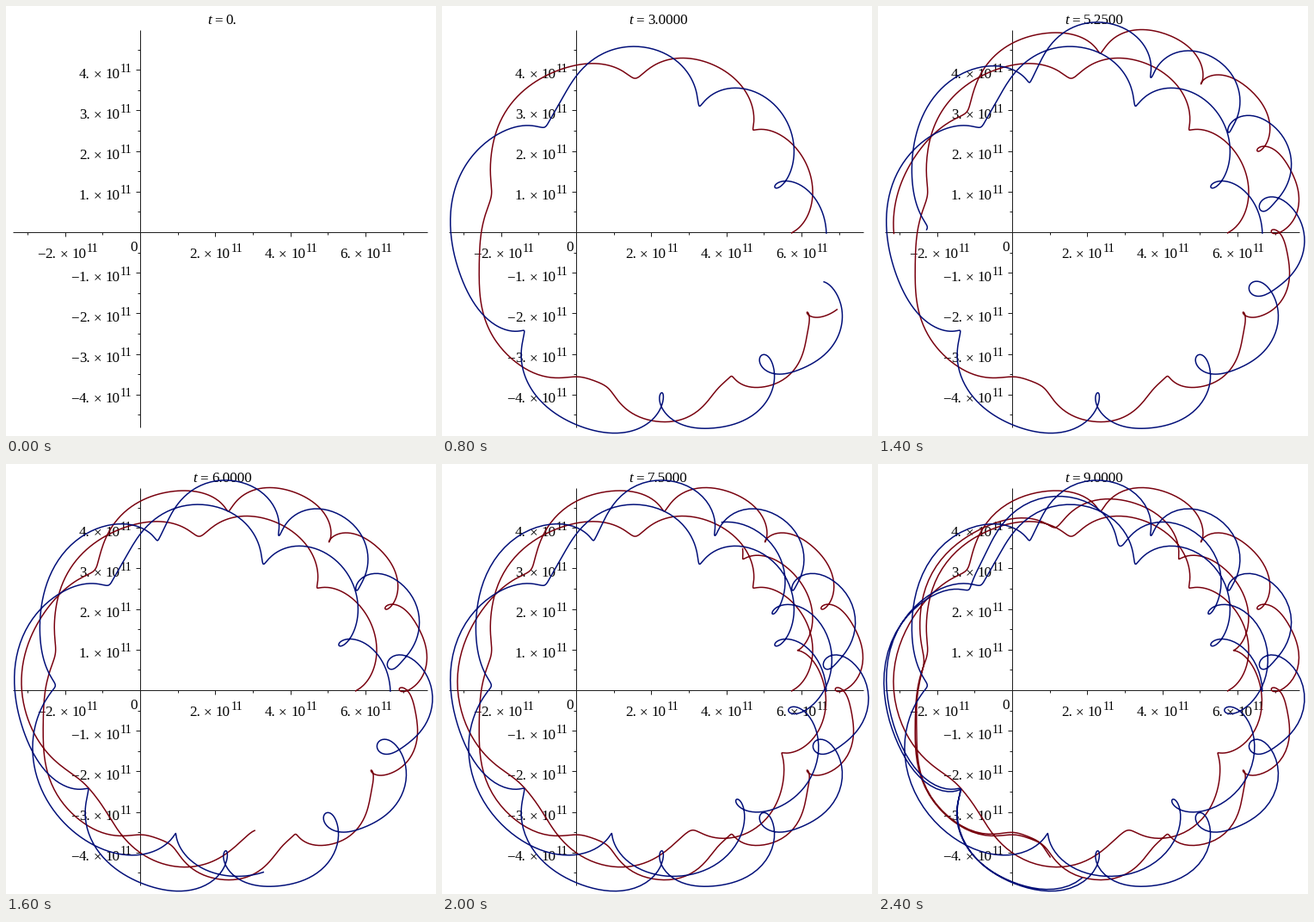
Write a matplotlib script that moves like this. It is 500 px wide and 500 px high and loops after 2500 ms.

```python
import numpy as np
import matplotlib.pyplot as plt
from matplotlib.animation import FuncAnimation

SIZE, DPI = 500, 100
PX = 72 / DPI
FRAMES, T_END = 25, 9.0
OX, OY, UX, UY = 157, 264, 43.65, 47.2  # origin and pixels per 1e11
RED, BLUE = "#78000e", "#000e78"

# A close pair circles a star at the origin. At each apsis of the wide orbit:
# time, distance, direction, eccentricity of the pair, mean angle of the pair.
APSIDES = np.array([
    (0.00, 6.08, 0, .06, 6),
    (1.56, 2.79, 180, .25, 1287),
    (3.42, 7.25, 365, .28, 3010),
    (5.27, 2.83, 545, .15, 4718),
    (6.89, 6.31, 726, .13, 6085),
    (8.47, 2.82, 904, .26, 7407),
    (10.33, 7.25, 1085, .30, 9200),
])
PAIR_SIZE = .94
PERIAPSIS = np.radians(70)
SHARE = .39  # red's part of the separation


def pair_center(t):
    """Follow half a Kepler ellipse from one apsis to the next."""
    time, dist, turn = APSIDES[:, :3].T
    k = np.clip(np.searchsorted(time, t, side="right") - 1, 0, len(time) - 2)
    mean = np.pi * (t - time[k]) / (time[k + 1] - time[k])
    a = (dist[k] + dist[k + 1]) / 2
    e = (dist[k + 1] - dist[k]) / (2 * a)
    ecc = mean + e * np.sin(mean)
    for _ in range(6):
        ecc -= (ecc - e * np.sin(ecc) - mean) / (1 - e * np.cos(ecc))
    true = np.arctan2(np.sqrt(1 - e * e) * np.sin(ecc), np.cos(ecc) - e)
    angle = np.radians(turn[k] + (turn[k + 1] - turn[k]) * true / np.pi)
    return a * (1 - e * np.cos(ecc)) * np.exp(1j * angle)


def pair_offset(t):
    """Vector from the red body to the blue one."""
    time = APSIDES[:, 0]
    e = np.interp(t, time, APSIDES[:, 3])
    mean = np.radians(np.interp(t, time, APSIDES[:, 4]))
    angle = mean + 2 * e * np.sin(mean - PERIAPSIS)
    return PAIR_SIZE * (1 - e * np.cos(angle - PERIAPSIS)) * np.exp(1j * angle)


def bodies(t):
    center, offset = pair_center(t), pair_offset(t)
    return center - SHARE * offset, center + (1 - SHARE) * offset


fig = plt.figure(figsize=(SIZE / DPI, SIZE / DPI), dpi=DPI, facecolor="white")
ax = fig.add_axes([0, 0, 1, 1])
ax.set(xlim=(0, SIZE), ylim=(SIZE, 0))
ax.axis("off")


def text(x, y, s, size=17, **kw):
    return ax.text(x, y, s, fontsize=size * PX, family="Liberation Serif",
                   ha="left", va="baseline", **kw)


def rule(x0, y0, x1, y1):
    ax.plot([x0 - .5, x1 - .5], [y0 - .5, y1 - .5], color="#202020", lw=PX,
            solid_capstyle="butt", snap=False, zorder=1)


def power_label(x, y, n):
    """Write n. x 10^11 with the digit starting at x."""
    if n < 0:
        text(x - 9.5, y, "\u2212")
    text(x, y, f"{abs(n)}.")
    text(x + 16.5, y, "\u00d7")
    text(x + 30.5, y, "10")
    text(x + 48, y - 7, "11", 14)


rule(OX, 29, OX, 491)
rule(9, OY, 491, OY)
for k in range(-3, 8):
    x = round(OX + k * UX)
    rule(x, OY, x, OY + (3 if k % 2 else 5))
for k in range(-9, 10):
    y = round(OY - k * UY / 2)
    rule(OX - (3 if k % 2 else 5), y, OX, y)
for n in (-2, 2, 4, 6):
    power_label(OX + n * UX - (24 if n < 0 else 31), 293, n)
for n in (-4, -3, -2, -1, 1, 2, 3, 4):
    power_label(85, OY - n * UY + 8.5, n)
text(144, 285, "0")

title_t = text(0, 21, "t", style="italic")
title_eq = text(0, 21, "=")
title_num = text(0, 21, "")

trails = [ax.plot([], [], color=c, lw=1.5 * PX, solid_joinstyle="round",
                  zorder=4)[0] for c in (RED, BLUE)]


def time_label(t):
    if t == 0:
        return "0."
    return f"{t:.5f}" if t < 1 else f"{t:.4f}"


def draw(frame):
    t = T_END * frame / (FRAMES - 1)
    label = time_label(t)
    left = 251.5 - (21.5 + 8.5 * (len(label) - .5)) / 2
    title_t.set_x(left)
    title_eq.set_x(left + 7.5)
    title_num.set_x(left + 21.5)
    title_num.set_text(label)
    steps = np.linspace(0, t, 800 if frame else 0)
    for line, z in zip(trails, bodies(steps)):
        line.set_data(OX + UX * z.real, OY - UY * z.imag)
    return [title_t, title_eq, title_num, *trails]


anim = FuncAnimation(fig, draw, frames=FRAMES, interval=100, repeat=True,
                     repeat_delay=0, blit=False)
plt.show()
```
